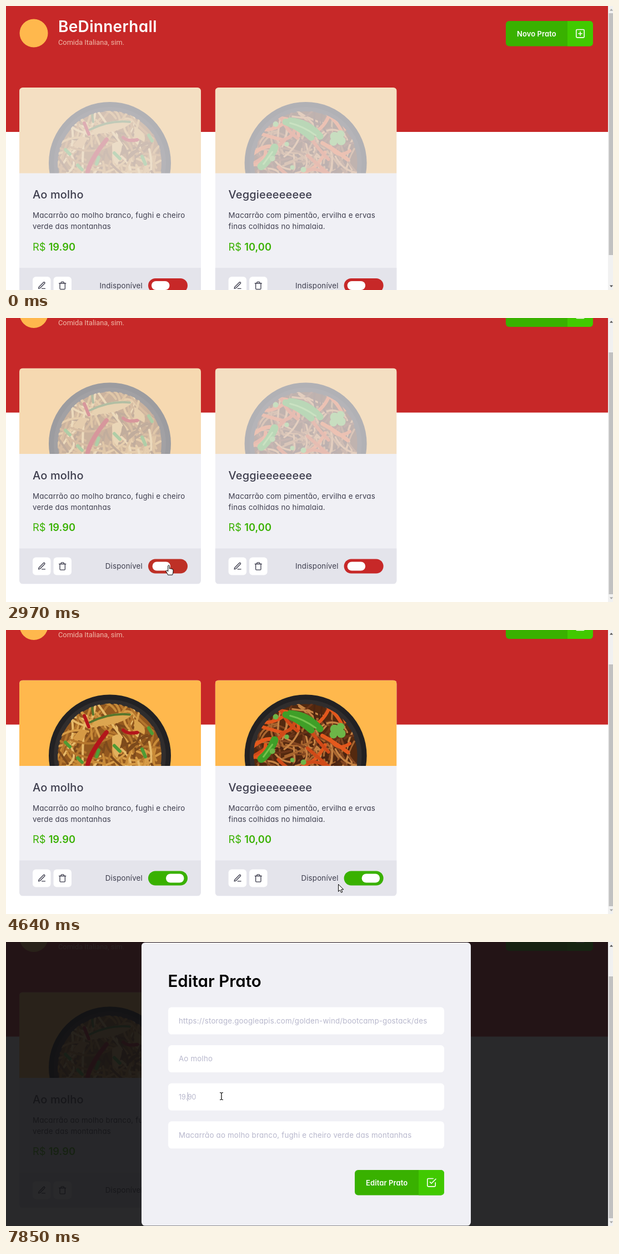
An HTML page that plays this animation: 1093x512 px, repeating every 8000 ms.

```html
<!DOCTYPE html>
<html lang="pt">
<head>
<meta charset="utf-8">
<title>Cardápio</title>
<style>
  html, body { margin: 0; width: 1093px; height: 512px; overflow: hidden; background: #fff; }
  svg { display: block; }
  text { font-family: Inter, "Open Sans", sans-serif; font-feature-settings: "cv11"; white-space: pre; }
  .body { font-size: 13.3px; letter-spacing: .2px; fill: #3d3d4d; }
  .name { font-size: 20px; font-weight: 500; letter-spacing: .15px; fill: #3d3d4d; }
  .price { font-size: 18.3px; fill: #39b100; }
  .price tspan { font-weight: 600; }
  .brand { font-size: 28px; font-weight: 600; letter-spacing: .3px; fill: #fff; }
  .sub { font-family: Roboto, sans-serif; font-size: 12.8px; fill: #efb9a8; }
  .btn { font-size: 13px; font-weight: 600; letter-spacing: .1px; fill: #fff; }
  .head { font-size: 29.5px; font-weight: 600; }
  .field { font-size: 13.3px; letter-spacing: .2px; fill: #b7b7cc; }
  .num { font-size: 12.4px; letter-spacing: 0; }
  .icon { fill: none; stroke-width: 2; stroke-linecap: round; stroke-linejoin: round; }
  .line { fill: none; stroke-linecap: round; }
</style>
</head>
<body>
<svg id="stage" width="1093" height="512" viewBox="0 0 1093 512"></svg>
<script>
const LOOP = 8000, SCROLL = 56.5, GAP = 352.6, STEP = 70;
const RED = [199, 40, 40], GREEN = [57, 177, 0];

// Spans of time in which the picture moves; it rests between them.
const spans = [
  [490, 630], [1030, 1790], [1860, 2620], [2690, 3390], [3590, 4360], [4430, 5060],
  [5390, 6070], [6200, 6410], [6610, 7310], [7440, 7510], [7710, 7850]
];

// Pointer hotspot: time, x, y
const path = [
  [490, 1072, 498], [560, 860, 436], [630, 632, 376], [1030, 610, 364], [1440, 401, 285],
  [1510, 400, 285], [1790, 379, 287], [2550, 294, 440], [2620, 293, 445], [3090, 293, 445],
  [3390, 631, 446], [3590, 631, 448], [4150, 629, 459], [4500, 629, 458], [4640, 598, 458],
  [5060, 409, 455], [5390, 400, 455], [5900, 110, 448], [6070, 75, 446], [6200, 75, 445],
  [6410, 75, 445], [6610, 82, 440], [7100, 374, 282], [7310, 351, 277], [7440, 342, 277],
  [7510, 331, 278], [7710, 323, 278], [7780, 350, 278], [7850, 388, 278]
];

const icons = {
  pen: '<path d="M12 20h9M16.5 3.5a2.12 2.12 0 0 1 3 3L7 19l-4 1 1-4z"/>',
  bin: '<path d="M3 6h18M19 6v14a2 2 0 0 1-2 2H7a2 2 0 0 1-2-2V6m3 0V4a2 2 0 0 1 2-2h4a2 2 0 0 1 2 2v2"/>',
  plus: '<rect x="3" y="3" width="18" height="18" rx="2"/><path d="M12 8v8M8 12h8"/>',
  check: '<path d="M9 11l3 3L22 4M21 12v7a2 2 0 0 1-2 2H5a2 2 0 0 1-2-2V5a2 2 0 0 1 2-2h11"/>'
};

const icon = (kind, x, y, scale, color) =>
  `<g class="icon" stroke="${color}" transform="translate(${x} ${y}) scale(${scale}) translate(-12 -12)">${icons[kind]}</g>`;
const rect = (x, y, w, h, fill, r = 0, more = '') =>
  `<rect x="${x}" y="${y}" width="${w}" height="${h}" rx="${r}" fill="${fill}" ${more}/>`;
const text = (cls, x, y, str, more = '') => `<text class="${cls}" x="${x}" y="${y}" ${more}>${str}</text>`;
const stroke = (d, color, w) => `<path class="line" d="${d}" stroke="${color}" stroke-width="${w}"/>`;

function button(x, y, split, w, label, kind) {
  const id = 'clip-' + kind;
  return `<clipPath id="${id}">${rect(x, y, w, 45.6, '#000', 6)}</clipPath>
    <g clip-path="url(#${id})">${rect(x, y, w, 46, '#39b100')}${rect(split, y, 60, 46, '#41c900')}</g>
    ${text('btn', x + 20, y + 27.5, label)}${icon(kind, split + 23, y + 22.7, .8, '#fff')}`;
}

function random(seed) {
  return () => (seed = seed * 16807 % 2147483647) / 2147483647;
}

// A heap of noodles: many short curved strands around the plate centre.
function noodles(seed, count, colors, width) {
  const rnd = random(seed);
  let out = '';
  for (let i = 0; i < count; i++) {
    const a = rnd() * 6.28, r = 92 * Math.sqrt(rnd()), turn = rnd() * 6.28;
    const x = r * Math.cos(a), y = r * Math.sin(a), len = 16 + rnd() * 22, bend = (rnd() - .5) * 46;
    const dx = len * Math.cos(turn), dy = len * Math.sin(turn);
    const d = `M${x - dx} ${y - dy}Q${x - dy / len * bend} ${y + dx / len * bend} ${x + dx} ${y + dy}`;
    out += stroke(d, colors[i % colors.length], width);
  }
  return out;
}

const dishes = [
  () => noodles(41, 150, ['#d79c47', '#7d4a1c', '#e6b968', '#b5762d', '#c98b38'], 4) +
    stroke('M-40 16Q-34-8 -6-42', '#b3161b', 8) + stroke('M-46-72L-38-52', '#b3161b', 6) +
    stroke('M24-46Q32-38 50-42', '#b3161b', 6) +
    '<path d="M-36-52Q-12-82 42-76Q24-54 -36-52z" fill="#dca650"/>' +
    '<path d="M4-34Q20-44 22-30L14 4Q4 2 4-34z" fill="#e2b05d"/>' +
    '<path d="M-66-30Q-56-52 -40-44L-50-26z" fill="#d69a45"/>' +
    '<path d="M44-66Q68-54 62-38L44-48z" fill="#d9a24b"/>' +
    stroke('M-32-88L-30-74M-36-60Q0-78 36-74', '#57762c', 4) +
    stroke('M8-18L18-8M-20-10L-24 2M-80-24L-72-16M58-12L64 2M70-50L76-40M-58 4L-50 12', '#4f9b35', 6),
  () => noodles(97, 150, ['#a9662f', '#4b2412', '#c58243', '#824520', '#6a3418'], 3.4) +
    noodles(23, 16, ['#e2571c', '#d04a18'], 6) +
    stroke('M-98-14Q-70-38 -52-26M60-92Q66-78 72-62M30-36Q52-24 76-6', '#e4591d', 7) +
    stroke('M-36-74Q-10-64 10-46M-28-76Q4-74 26-48', '#3f9f28', 12) +
    stroke('M-80 6Q-66-4 -56-28', '#3f9f28', 14) +
    stroke('M-28-72Q-4-66 18-50M-76 2L-60-20', '#74c24c', 3) +
    [[52, -48, 8], [63, -52, 7], [50, -38, 7], [64, -40, 8], [-54, -70, 5], [-60, -8, 5], [-4, 12, 5], [-24, 8, 4], [-34, -34, 4]]
      .map(([x, y, r]) => `<circle cx="${x}" cy="${y}" r="${r}" fill="#6db548"/>`).join('')
];

function card(i, name, lines, price) {
  return `<g transform="translate(${i * GAP} 0)" clip-path="url(#card)">
    ${rect(24, 147, 327, 389, '#f0f0f5')}
    <g id="photo${i}" clip-path="url(#photo)">
      ${rect(24, 147, 327, 155, '#ffb84d')}
      <g transform="translate(187 283)">
        <circle r="110" fill="#222123"/><circle r="101" fill="#302d2d"/>
        <g clip-path="url(#plate)"><circle r="93" fill="${['#94591f', '#54290f'][i]}"/>${dishes[i]()}</g>
      </g>
    </g>
    ${text('name', 48, 347, name)}
    ${lines.map((s, n) => text('body', 48, 382 + 20 * n, s)).join('')}
    ${text('price', 48, 440.5, `R$ <tspan>${price}</tspan>`)}
    ${rect(24, 472, 327, 64, '#e4e4eb')}
    ${rect(48, 488, 32.5, 32, '#fff', 6)}${icon('pen', 64.5, 504, .667, '#3d3d4d')}
    ${rect(85.5, 488, 32.5, 32, '#fff', 6)}${icon('bin', 101.7, 504, .667, '#3d3d4d')}
    ${text('body', 246, 508.7, '', `id="status${i}" text-anchor="end"`)}
    ${rect(256, 491, 71, 26, '#c72828', 13, `id="track${i}"`)}
    ${rect(262, 496, 32.5, 16, '#fff', 8, `id="knob${i}"`)}
  </g>`;
}

const fields = ['', 'Ao molho', '', 'Macarrão ao molho branco, fughi e cheiro verde das montanhas'];

document.getElementById('stage').innerHTML = `
  <clipPath id="card">${rect(24, 147, 327, 389, '#000', 6.4)}</clipPath>
  <clipPath id="photo">${rect(24, 147, 327, 154.5, '#000')}</clipPath>
  <clipPath id="plate"><circle r="94"/></clipPath>
  ${rect(0, 0, 1093, 512, '#fff')}
  <g id="page">
    ${rect(0, 0, 1084, 227, '#c72828')}
    <circle cx="50" cy="49" r="25.5" fill="#ffb84d"/>
    ${text('brand', 94, 47, 'BeDinnerhall')}
    ${text('sub', 94, 69.5, 'Comida Italiana, sim.')}
    ${button(900, 27, 1011, 157, 'Novo Prato', 'plus')}
    ${card(0, 'Ao molho', ['Macarrão ao molho branco, fughi e cheiro', 'verde das montanhas'], '19.90')}
    ${card(1, 'Veggieeeeeeee', ['Macarrão com pimentão, ervilha e ervas', 'finas colhidas no himalaia.'], '10,00')}
  </g>
  <g id="modal">
    ${rect(0, 0, 1084, 512, '#121214', 0, 'opacity=".9"')}
    ${rect(244, 1, 593, 510.5, '#f0f0f5', 6.4)}
    ${text('head', 291.5, 80.5, 'Editar Prato')}
    ${fields.map((s, n) => rect(292, 117.5 + 68.6 * n, 497, 49, '#fff', 6.4) + text('field', 311, 146.7 + 68.6 * n, s)).join('')}
    <svg x="311" y="118" width="458" height="48">
      ${text('field', 0, 28.7, 'https://storage.googleapis.com/golden-wind/bootcamp-gostack/des')}
    </svg>
    ${text('field num', 311, 284, '19.90')}
    ${rect(326.6, 271, 1, 16, '#a5a5bb', 0, 'id="caret"')}
    ${button(628, 411, 743, 161, 'Editar Prato', 'check')}
  </g>
  ${rect(1084, 0, 9, 512, '#f1f1f1')}
  ${rect(1085.5, 13, 7.5, 436, '#c1c1c1', 0, 'id="thumb"')}
  <path id="up" d="M1087 8.5h6l-3-3.5z"/><path id="down" d="M1087 503.5h6l-3 3.5z"/>
  <g id="pointer" stroke-linejoin="round">
    <path id="arrow" d="M.5 .5V13.5L3.5 10.7L5.7 15.3L7.8 14.3L5.7 9.8H9.8z" fill="#fff" stroke="#000"/>
    <path id="hand" d="M-1.2 1.5Q0-.3 1.2 1.5V7Q2.5 5.8 3.6 7.2Q5 6.2 6 7.8Q7.6 7.2 8 9V13Q7.8 15.5 6.5 18.2H-1.4Q-2.6 15.4-5 11.8Q-5-9.8 -5 10.6Q-3.6 9.4-1.2 12z" fill="#fff" stroke="#000"/>
    <path id="beam" d="M-3-6.5Q-.8-6.5 0-5.5Q.8-6.5 3-6.5M0-5.5V5.5M-3 6.5Q-.8 6.5 0 5.5Q.8 6.5 3 6.5" fill="none" stroke="#000" stroke-width="1.2"/>
  </g>`;

const $ = id => document.getElementById(id);
$('hand').setAttribute('d', 'M-1.3 1.6Q0-.4 1.3 1.6V7Q2.6 5.8 3.6 7.2Q5 6.2 6 7.8Q7.6 7.2 8 9V13Q7.8 15.5 6.5 18.2H-1.4Q-2.6 15.4-4.9 11.8Q-4.9 9.6-3.3 10L-1.3 11.8z');

const set = (id, key, value) => $(id).setAttribute(key, value);
const show = (id, on) => set(id, 'visibility', on ? 'visible' : 'hidden');
const clamp = v => Math.max(0, Math.min(1, v));
const ease = p => p * p * (3 - 2 * p);
const inside = (x, y, l, t, w, h) => x >= l && x <= l + w && y >= t && y <= t + h;

function snap(t) {
  let rest = 0;
  for (const [from, to] of spans) {
    if (t < from) break;
    if (t < to) return Math.max(from, to - STEP * Math.ceil((to - t) / STEP));
    rest = to;
  }
  return rest;
}

function pointerAt(t) {
  const i = path.findIndex(k => k[0] > t);
  if (i < 0) return path[path.length - 1].slice(1);
  const [t0, x0, y0] = path[i - 1], [t1, x1, y1] = path[i];
  const p = (t - t0) / (t1 - t0);
  return [x0 + (x1 - x0) * p, y0 + (y1 - y0) * p];
}

function pointerKind(x, y, scroll, modal) {
  if (modal) return inside(x, y, 292, 254, 497, 49) || inside(x, y, 292, 323, 497, 49) ? 'beam' : 'arrow';
  const hot = [0, GAP].some(dx =>
    inside(x - dx, y + scroll, 256, 491, 71, 26) ||
    inside(x - dx, y + scroll, 48, 488, 32.5, 32) ||
    inside(x - dx, y + scroll, 85.5, 488, 32.5, 32));
  return hot ? 'hand' : 'arrow';
}

function drawSwitch(i, t, start) {
  const p = clamp((t - start) / 300), e = ease(p);
  const mix = RED.map((v, n) => Math.round(v + (GREEN[n] - v) * e));
  $('status' + i).textContent = t < start ? 'Indisponível' : 'Disponível';
  set('photo' + i, 'opacity', .3 + .7 * p);
  set('track' + i, 'fill', `rgb(${mix})`);
  set('knob' + i, 'x', 262 + 26 * e);
}

function draw(now) {
  const t = snap(now % LOOP);
  const scroll = SCROLL * ease(clamp((t - 1465) / 325));
  const modal = t >= 6410;
  set('page', 'transform', `translate(0 ${-scroll})`);
  set('thumb', 'y', 13 + scroll * 49 / SCROLL);
  set('up', 'fill', scroll > 0 ? '#505050' : '#a3a3a3');
  set('down', 'fill', scroll < SCROLL ? '#505050' : '#a3a3a3');
  drawSwitch(0, t, 2925);
  drawSwitch(1, t, 4315);
  set('modal', 'display', modal ? 'inline' : 'none');
  show('caret', t >= 7710);

  const visible = t >= path[0][0];
  const [x, y] = visible ? pointerAt(t) : [0, 0];
  const kind = pointerKind(x, y, scroll, modal);
  set('pointer', 'transform', `translate(${x} ${y})`);
  for (const k of ['arrow', 'hand', 'beam']) show(k, visible && k === kind);
}

const begin = performance.now();
function tick() {
  draw(performance.now() - begin);
  requestAnimationFrame(tick);
}
draw(0);
requestAnimationFrame(tick);
</script>
</body>
</html>
```
